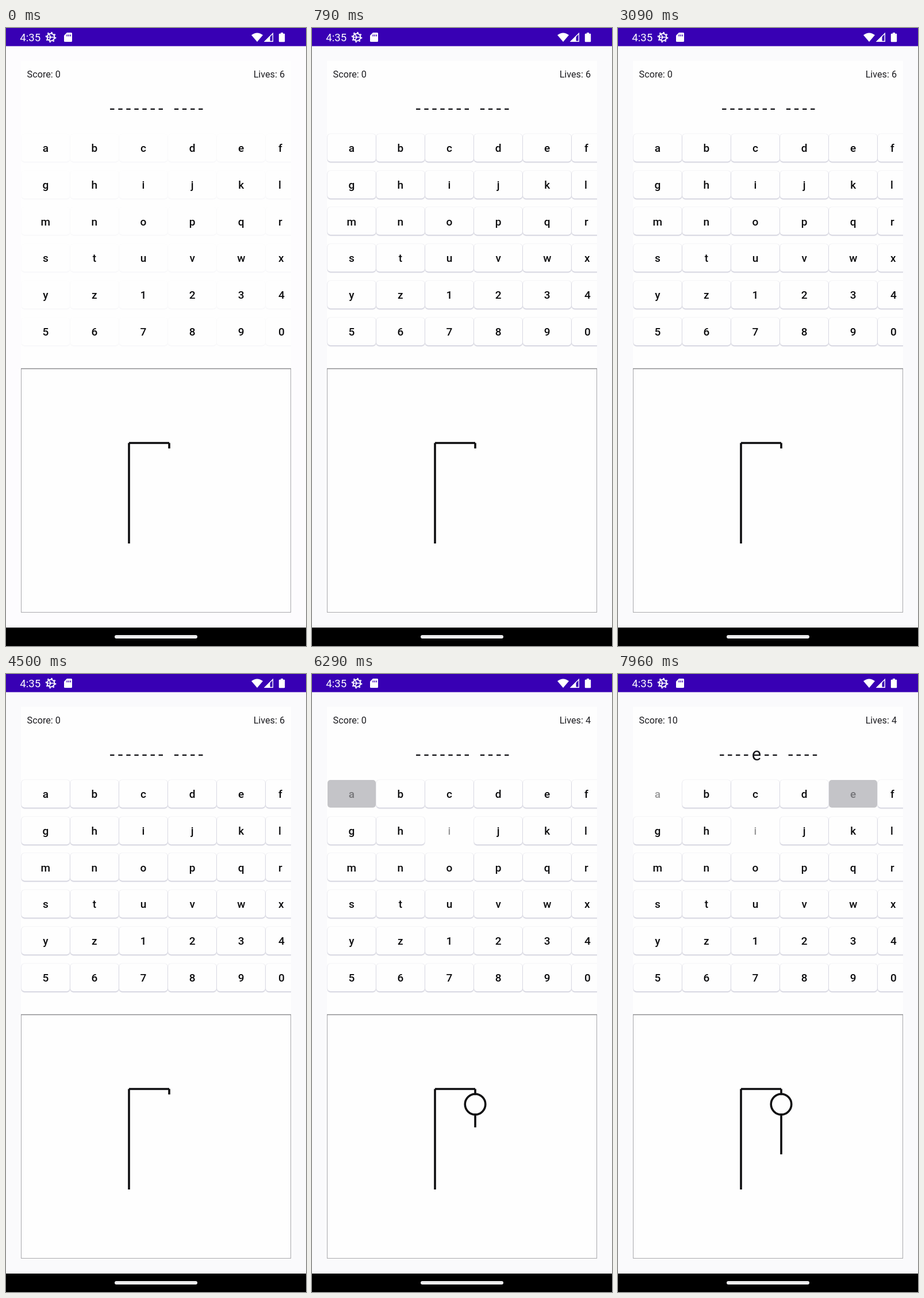
Write an HTML page that moves like this. It is 522x1073 px and loops after 8000 ms.

```html
<!DOCTYPE html>
<html lang="en">
<head>
<meta charset="utf-8">
<title>Word game</title>
<style>
html, body { margin: 0; width: 100%; height: 100%; overflow: hidden; }
body { position: relative; background: #fafafc; font-family: Roboto, sans-serif; animation: settle-page 8s linear infinite; }
svg { position: absolute; left: 0; top: 0; }
.layer { position: absolute; left: 26px; top: 170px; width: 470px; height: 400px; overflow: hidden; }
.cards { animation: settle-cards 8s linear infinite; }
.card, .press { position: absolute; width: 84px; height: 48px; border-radius: 5px; }
.card { background: #fefefe; box-shadow: 0 1.4px 1.8px rgba(50, 50, 105, .24), 0 0 1.4px rgba(50, 50, 105, .2); }
.press { overflow: hidden; }
.press::before { content: ""; position: absolute; left: -8px; top: -26px; width: 100px; height: 100px; border-radius: 50%; background: #c4c4c8; opacity: 0; }
.label { position: absolute; font-size: 19px; font-weight: 500; line-height: 24px; color: #0b0b0d; white-space: pre; }
.mid { width: 84px; text-align: center; }

/* hard switches */
.sw { animation: 8s step-end infinite; }
.to-i { animation-name: to-i; }
.i-to-a { animation-name: i-to-a; }
.from-a { animation-name: from-a; }
.to-e { animation-name: to-e; }
.from-e { animation-name: from-e; }
@keyframes to-i { 0% { opacity: 1 } 58%, 100% { opacity: 0 } }
@keyframes i-to-a { 0% { opacity: 0 } 58% { opacity: 1 } 76.63%, 100% { opacity: 0 } }
@keyframes from-a { 0% { opacity: 0 } 76.63%, 100% { opacity: 1 } }
@keyframes to-e { 0% { opacity: 1 } 97.56%, 100% { opacity: 0 } }
@keyframes from-e { 0% { opacity: 0 } 97.56%, 100% { opacity: 1 } }

@keyframes settle-page { 0%, .5% { background-color: #fdfcfe } 6%, 100% { background-color: #fafafc } }
@keyframes settle-cards { 0%, .5% { opacity: .15 } 6%, 100% { opacity: 1 } }

/* used keys: card sinks, label dims, ripple spreads and fades */
.card.i { animation: card-i 8s linear infinite; }
.card.a { animation: card-a 8s linear infinite; }
.card.e { animation: card-e 8s linear infinite; }
@keyframes card-i { 0%, 58% { opacity: 1 } 59.25%, 100% { opacity: 0 } }
@keyframes card-a { 0%, 76.63% { opacity: 1 } 77.88%, 100% { opacity: 0 } }
@keyframes card-e { 0%, 97.56% { opacity: 1 } 98.81%, 100% { opacity: 0 } }

.label.i { animation: dim-i 8s step-end infinite; }
.label.a { animation: dim-a 8s step-end infinite; }
.label.e { animation: dim-e 8s step-end infinite; }
@keyframes dim-i { 0% { opacity: 1 } 58%, 100% { opacity: .42 } }
@keyframes dim-a { 0% { opacity: 1 } 76.63%, 100% { opacity: .42 } }
@keyframes dim-e { 0% { opacity: 1 } 97.56%, 100% { opacity: .42 } }

.press.i::before { animation: spread-i 8s ease-out infinite, glow-i 8s linear infinite; }
.press.a::before { animation: spread-a 8s ease-out infinite, glow-a 8s linear infinite; }
.press.e::before { animation: spread-e 8s ease-out infinite, glow-e 8s linear infinite; }
@keyframes spread-i { 0%, 56.8% { transform: scale(.3) } 59.6%, 100% { transform: scale(1) } }
@keyframes spread-a { 0%, 75.6% { transform: scale(.3) } 78.4%, 100% { transform: scale(1) } }
@keyframes spread-e { 0%, 96.4% { transform: scale(.3) } 99.2%, 100% { transform: scale(1) } }
@keyframes glow-i { 0%, 56.8% { opacity: 0 } 57.75%, 62.44% { opacity: 1 } 67.13%, 100% { opacity: 0 } }
@keyframes glow-a { 0%, 75.6% { opacity: 0 } 76.55%, 81.25% { opacity: 1 } 85.94%, 100% { opacity: 0 } }
@keyframes glow-e { 0%, 96.4% { opacity: 0 } 97.35%, 100% { opacity: 1 } }

/* figure strokes grow along their path */
.head, .torso { stroke-dasharray: 100 200; }
.head { animation: head 8s linear infinite, from-i 8s step-end infinite; }
.torso { animation: torso 8s linear infinite, from-a 8s step-end infinite; }
@keyframes from-i { 0% { opacity: 0 } 58%, 100% { opacity: 1 } }
@keyframes head { 0%, 58% { stroke-dashoffset: 100 } 64.2%, 100% { stroke-dashoffset: 0 } }
@keyframes torso { 0%, 76.63% { stroke-dashoffset: 100 } 82.88%, 100% { stroke-dashoffset: 0 } }
</style>
</head>
<body>
<svg width="522" height="1073" viewBox="0 0 522 1073">
  <rect x="26" y="57" width="470" height="958" fill="#fefefe"/>

  <!-- status bar -->
  <rect width="522" height="31.5" fill="#3800b4"/>
  <g fill="#fff">
    <text x="24.3" y="23" font-size="18.6">4:35</text>
    <g fill="none" stroke="#fff">
      <circle cx="78" cy="16" r="6.4" stroke-width="1.9"/>
      <circle cx="78" cy="16" r="8.3" stroke-width="2" stroke-dasharray="2.6 3.92"/>
      <path d="M72 16H84M75 11l3 5M75 21l3-5" stroke-width="1.5"/>
    </g>
    <path fill-rule="evenodd" d="M106 8h7.5q1.5 0 1.5 1.5v13q0 1.500-1.500 1.500h-11q-1.500 0-1.500-1.500V13zM105.500 11.500v3h1.500v-3zM108.500 11.500v3h1.500v-3zM111.500 11.500v3h1.500v-3z"/>
    <path d="M427 12.300Q437 4.500 447 12.300L437 24z"/>
    <path d="M449 24L459.500 13.500V24z"/>
    <path d="M450.500 23.300L464.300 9.500V23.300z" fill="none" stroke="#fff" stroke-width="1.400"/>
    <path d="M478 8h4v1.800h2q1.200 0 1.200 1.200v12q0 1.200-1.200 1.200h-8q-1.200 0-1.200-1.200v-12q0-1.200 1.200-1.200h2z"/>
  </g>

  <!-- counters -->
  <g font-size="16.2" fill="#1c1c20">
    <text class="sw to-e" x="36.600" y="86.300">Score: 0</text>
    <text class="sw from-e" x="36.600" y="86.300">Score: 10</text>
    <g text-anchor="end">
      <text class="sw to-i" x="485" y="86.300">Lives: 6</text>
      <text class="sw i-to-a" x="485" y="86.300">Lives: 5</text>
      <text class="sw from-a" x="485" y="86.300">Lives: 4</text>
    </g>
  </g>

  <!-- hidden word -->
  <g font-size="31" letter-spacing="5.5" fill="#151519">
    <text class="sw to-e" x="180.600" y="150.300">------- ----</text>
    <text class="sw from-e" x="176.400" y="150.300">----e-- ----</text>
  </g>

  <!-- drawing area -->
  <rect x="26.500" y="591.500" width="469" height="423" fill="#fefefe" stroke="#a9a9ac"/>
  <path d="M26 591.500H496" stroke="#8c8c8f" stroke-width="1.300"/>
  <g fill="none" stroke="#0e0e10" stroke-width="3.600">
    <path d="M214 720.500V895M214 720.500H284M284 720.500V730"/>
    <path class="head" pathLength="100" d="M284 729.300a17.800 17.800 0 0 1 0 35.600a17.800 17.800 0 0 1 0-35.600"/>
    <path class="torso" pathLength="100" d="M284 765V834"/>
  </g>

  <!-- navigation bar -->
  <rect y="1041" width="522" height="32"/>
  <rect x="189" y="1054" width="144" height="6" rx="3" fill="#ececee"/>
</svg>

<div class="layer cards" id="cards"></div>
<div class="layer" id="labels"></div>

<script>
const cards = document.getElementById("cards");
const labels = document.getElementById("labels");

function add(parent, cls, x, y, text = "") {
  const el = document.createElement("div");
  el.className = cls;
  el.style.left = x + "px";
  el.style.top = y + "px";
  el.textContent = text;
  parent.append(el);
}

[..."abcdefghijklmnopqrstuvwxyz1234567890"].forEach((key, n) => {
  const col = n % 6;
  const x = 0.8 + col * 85.1;
  const y = 13.7 + Math.floor(n / 6) * 63.8;
  const used = "aei".includes(key) ? " " + key : "";
  add(cards, "card" + used, x, y);
  if (used) add(labels, "press" + used, x, y);
  // the last column is cut off, so its labels start at a fixed left edge
  if (col === 5) add(labels, "label", 448, y + 13.3, key);
  else add(labels, "label mid" + used, x, y + 13.3, key);
});
</script>
</body>
</html>
```
